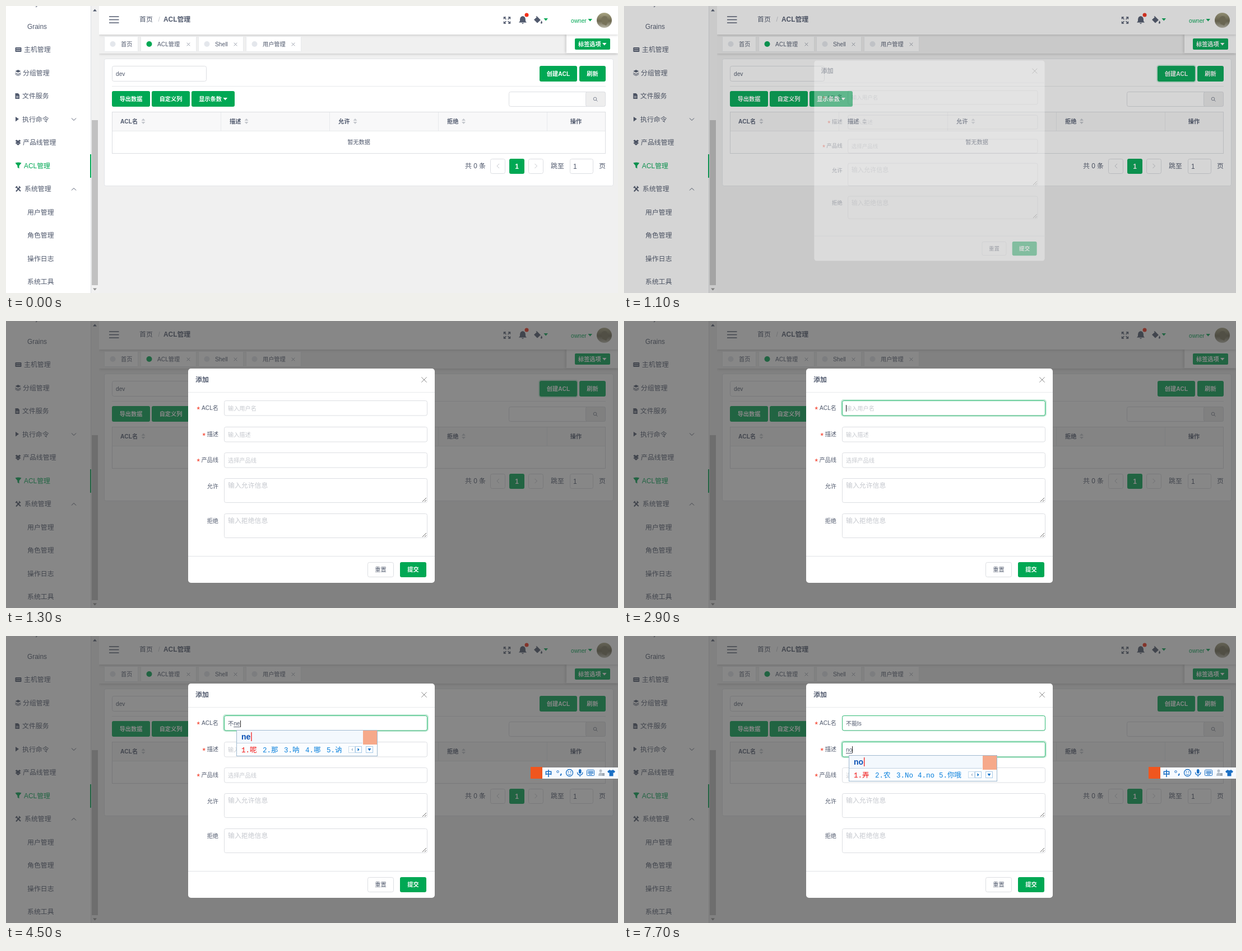
An HTML page for the animation above (8000 ms loop, 1092 by 513 pixels).

```html
<!DOCTYPE html>
<html lang="zh-CN">
<head>
<meta charset="utf-8">
<style>
html, body { margin: 0; width: 100%; height: 100%; overflow: hidden; background: #f0f0f0; }
svg { display: block; font-family: "Liberation Sans", "Noto Sans CJK SC", sans-serif; }
.soft { filter: drop-shadow(0 1px 2px rgba(0, 0, 0, .18)); }
.mono { font-family: "Liberation Mono", "Noto Sans CJK SC", monospace; }
</style>
</head>
<body>
<svg id="stage" width="1092" height="513" viewBox="0 0 1092 513"></svg>
<script>
const LOOP = 8000, STEP = 100;
const INK = '#515a6e', GREEN = '#00a854', LINE = '#dcdee2', PALE = '#c5c8ce', BLUE = '#1a6fc4';
const SMALL = 10.2, LARGE = 11.9;
const stage = document.getElementById('stage');
const pen = document.createElement('canvas').getContext('2d');

// y is the middle of the line of text
const text = (x, y, s, fill = INK, size = SMALL, more = '') =>
  `<text x="${x}" y="${y + size * .37}" fill="${fill}" font-size="${size}" ${more}>${s}</text>`;
const rect = (x, y, w, h, fill, more = '') =>
  `<rect x="${x}" y="${y}" width="${w}" height="${h}" fill="${fill}" ${more}/>`;
const box = (x, y, w, h, fill = '#fff', stroke = LINE, r = 3) =>
  rect(x + .5, y + .5, w - 1, h - 1, fill, `stroke="${stroke}" rx="${r}"`);
const line = (d, stroke = INK, width = 1) =>
  `<path d="${d}" fill="none" stroke="${stroke}" stroke-width="${width}"/>`;
const fill = (d, color = INK) => `<path d="${d}" fill="${color}"/>`;
const dot = (x, y, r, color, more = '') => `<circle cx="${x}" cy="${y}" r="${r}" fill="${color}" ${more}/>`;
const cross = (x, y, r, color) => line(`M${x - r} ${y - r}l${2 * r} ${2 * r}m0 ${-2 * r}l${-2 * r} ${2 * r}`, color);
const drop = (x, y, color, w = 7.5) => fill(`M${x} ${y - 2}h${w}l${-w / 2} 4.4z`, color);
const chevron = (x, y, dx, dy, color) =>
  line(dy ? `M${x - 4} ${y - dy}l4 ${2 * dy}l4 ${-2 * dy}` : `M${x - dx} ${y - 4}l${2 * dx} 4l${-2 * dx} 4`, color);
const BOLD = 'font-weight="bold"', MID = 'text-anchor="middle"', END = 'text-anchor="end"';

const button = (x, y, w, h, label, menu) =>
  rect(x, y, w, h, GREEN, 'rx="3"') +
  text(x + w / 2 - (menu ? 5 : 0), y + h / 2, label, '#fff', SMALL, `${BOLD} ${MID}`) +
  (menu ? drop(x + w - 21 + menu, y + h / 2, '#fff') : '');

const clamp = v => Math.max(0, Math.min(1, v));
const ramp = (t, from, to) => clamp((t - from) / (to - from));
const easeInOut = p => p < .5 ? 2 * p * p : 1 - 2 * (1 - p) ** 2;
const width = (s, font = SMALL + 'px') => {
  pen.font = `${font} "Liberation Sans", "Noto Sans CJK SC", sans-serif`;
  return pen.measureText(s).width;
};

function sidebar() {
  const rows = [['Key', 38], ['Grains', 38], ['主机管理', 32], ['分组管理', 30], ['文件服务', 29], ['执行命令', 29],
    ['产品线管理', 30], ['ACL管理', 32], ['系统管理', 33], ['用户管理', 38], ['角色管理', 38], ['操作日志', 38], ['系统工具', 38]];
  return rect(0, 0, 151, 513, '#fff') + rect(151, 0, 1, 513, LINE) +
    rect(152, 0, 14, 513, '#f1f1f1') + rect(153, 204, 11, 295, '#c1c1c1') +
    fill('M155 9.5h7l-3.5-4z') + fill('M155 504.500h7l-3.5 4z', '#909090') +
    rows.map(([s, x], i) => text(x, -5 + 41.5 * i, s, i == 7 ? GREEN : INK, LARGE)).join('') +
    rect(150, 265, 2, 42, GREEN) +
    rect(16.5, 74, 11, 8, INK, 'rx="1"') + line('M18 76.500h8M18 79.500h8', '#fff', .8) +
    fill('M21.500 114l5 2.500-5 2.500-5-2.500zM16.500 119l5 2.400 5-2.400v1.300l-5 2.400-5-2.400zM16.500 121.500l5 2.400 5-2.400v1l-5 2.400-5-2.400z') +
    fill('M16.500 156h5l2.500 2.500v7.500h-7.500z') + line('M18 161.500h4.500M18 163.500h4.500', '#fff', .8) +
    fill('M17 198l6 4-6 4.500z') +
    fill('M16.500 241l2.500-2 2.500 2 2.500-2 2.500 2-2.500 2 2.500 2-2.500 1.500-2.500-1.500-2.500 1.500-2.500-1.500 2.500-2zM18.500 247l3-1.500 3 1.500-3 2z') +
    fill('M16.500 280.500q5.500-2 11 0l-4 5v5l-3-2v-3z', GREEN) +
    line('M18 331.500l7-8M18 323l8 8', INK, 2) + line('M17 325l3-3M23 322l3 3', INK, 1.5) +
    chevron(121, 202.500, 0, 2, INK) + chevron(121, 327.500, 0, -2, INK);
}

function header() {
  const tabs = [[175, 61, '首页', 205], [240, 100, 'ACL管理', 270], [343, 81, 'Shell', 373], [428, 99, '用户管理', 458]];
  return rect(166, 51, 926, 34, '#f0f0f0', 'class="soft"') +
    rect(1000, 51, 92, 33, '#fff', 'style="filter:drop-shadow(-2px 0 2px rgba(0,0,0,.14))"') +
    rect(166, 0, 926, 51, '#fff', 'class="soft"') +
    line('M184 19h17.500M184 24.500h17.500M184 30h17.500', INK, 1.6) +
    text(238, 24, '首页', INK, LARGE) + text(271.5, 24, '/', PALE, LARGE) + text(281, 24, 'ACL管理', INK, LARGE, BOLD) +
    line('M888.500 23.500v-3.500h3.500M896 20h3.500v3.500M899.500 27.500v3.500h-3.500M892 31h-3.500v-3.500M889 20.500l3.500 3.500M899 20.500l-3.500 3.500M889 30.500l3.500-3.500M899 30.500l-3.500-3.500', INK, 1.5) +
    fill('M922 18q5 .5 5 7v2l2 2.500h-14l2-2.500v-2q0-6.500 5-7zM920 30.500h4q-2 3-4 0z') + dot(929, 16, 3.5, '#f5301a') +
    fill('M947 18l7 7-6 5.500-6-6 5-4.500-1.500-1.500zM955.500 26q3 5 0 5.500t0-5.500z') +
    drop(959.5, 24, GREEN) + text(1008, 26, 'owner', GREEN) + drop(1038.5, 25, GREEN) +
    dot(1067.5, 25.5, 13.5, 'url(#photo)') + fill('M1062 23q3-7 10-4l3 8-4 8-7-3z', '#78735a') +
    tabs.map(([x, w, s, tx], i) => box(x, 54, w, 28, '#fff', '#e8eaec', 1) +
      dot(tx - 14.5, 68, 5, i == 1 ? GREEN : '#e4e7ec') + text(tx, 68, s) +
      (i ? cross(x + w - 14.500, 68.5, 2.8, '#9aa0ac') : '')).join('') +
    rect(1015, 58, 63, 20, GREEN, 'rx="2"') + text(1021, 68, '标签选项', '#fff', SMALL, BOLD) + drop(1064, 68, '#fff');
}

function card() {
  const cols = [['ACL名', 204, 245], ['描述', 399, 429], ['允许', 593, 623], ['拒绝', 787, 816.5]];
  const pageBox = x => box(x, 273, 27, 27);
  return box(175, 94, 909, 228, '#fff', '#e3e5e8') +
    box(189, 107, 169, 28) + text(196, 121, 'dev') +
    button(952, 107, 67, 28, '创建ACL') + button(1023, 107, 47, 28, '刷新') +
    rect(189, 143, 881, 1, '#e8eaec') +
    button(189, 152, 68, 28, '导出数据') + button(260, 152, 68, 28, '自定义列') + button(331, 152, 77, 28, '显示条数', .5) +
    box(897, 153, 173, 27) + box(1034, 153, 36, 27, '#eee') +
    dot(1051, 166, 2.8, 'none', 'stroke="#808695"') + line('M1053 168l2.500 2.500', '#808695') +
    box(189, 189, 881, 75, '#fff', LINE, 0) + rect(190, 190, 879, 33, '#f8f8f9') + rect(190, 223, 879, 1, '#e8eaec') +
    [383, 577, 771, 965].map(x => rect(x, 190, 1, 33, '#e8eaec')).join('') +
    cols.map(([s, x, sort]) => text(x, 206, s, INK, SMALL, BOLD) +
      fill(`M${sort - 3.5} 205l3.500-4 3.500 4zm0 2h7l-3.500 4z`, PALE)).join('') +
    text(1017, 206, '操作', INK, SMALL, BOLD + MID.padStart(21)) +
    text(629.5, 243, '暂无数据', INK, SMALL, MID) +
    text(819, 286, '共 0 条', INK, LARGE) + pageBox(864) + chevron(878, 286, -2, 0, PALE) +
    rect(898, 273, 27, 27, GREEN, 'rx="3"') + text(911.5, 286.5, '1', '#fff', LARGE, `${BOLD} ${MID}`) +
    pageBox(932) + chevron(945.5, 286, 2, 0, PALE) +
    text(972, 286, '跳至', INK, LARGE) + box(1006, 273, 42, 27) + text(1012, 286.5, '1', INK, LARGE) + text(1058, 286, '页', INK, LARGE);
}

const page = `<defs><linearGradient id="photo" x2="0" y2="1"><stop stop-color="#a9a583"/><stop offset=".55" stop-color="#6f6a52"/>
  <stop offset="1" stop-color="#b9b7a8"/></linearGradient></defs>` +
  rect(0, 0, 1092, 513, '#f0f0f0') + card() + header() + sidebar();

// start time, field, committed text, text being composed, candidates
const typing = [
  [1900, 0, '', ''],
  [4000, 0, '', 'b', '不 吧 被 把 b'],
  [4100, 0, '', 'bu', '不 部 步 布 b'],
  [4300, 0, '不', ''],
  [4400, 0, '不', 'n', '你 那 能 年 呢'],
  [4500, 0, '不', 'ne', '呢 那 呐 哪 讷'],
  [4600, 0, '不', 'neng', '能 嫩 弄 农 浓'],
  [4700, 0, '不能', ''],
  [5700, 0, '不能', 'l', '了 来 里 老 啦'],
  [5800, 0, '不能', 'ls', '老师 历史 ls 临时 零食'],
  [6100, 0, '不能ls', ''],
  [6400, 1, '', ''],
  [7700, 1, '', 'no', '弄 农 No no 你哦']
];
const fieldY = [142, 189, 235];

function popup(x, y, typed, list) {
  let cx = x + 9;
  const row = list.split(' ').map((s, i) => {
    const item = text(cx, y + 35, `${i + 1}.${s}`, i ? '#0a80dc' : '#f01010', 12.5, 'class="mono"');
    cx += 25 + [...s].reduce((sum, c) => sum + (c > 'z' ? 13 : 6.5), 0);
    return item;
  }).join('');
  const w = cx - x + 53;
  return box(x, y, w, 47, '#fbfdff', '#9fb9cf', 0) + rect(x + 1, y + 1, w - 2, 22, '#f3f8fd') +
    rect(x + 1, y + 23, w - 28, 1, '#c3d2e0') +
    text(x + 9, y + 12, typed, '#0a50b4', 14, BOLD) +
    rect(x + 10 + width(typed, 'bold 14px'), y + 4, 1.2, 16, '#f01010') + row +
    box(cx + 1, y + 29, 12, 12, '#fff', '#c8dcec', 0) + box(cx + 13, y + 29, 12, 12, '#fff', '#a8cbe8', 0) +
    box(cx + 32, y + 29, 13, 12, '#fff', '#a8cbe8', 0) +
    fill(`M${cx + 9} ${y + 32}v6l-3-3z`, '#b8c8d8') + fill(`M${cx + 17.500} ${y + 32}v6l3-3z`, '#0a70c8') +
    drop(cx + 35.5, y + 35, '#0a70c8', 6) + rect(x + w - 26, y + 1, 25, 25, '#f6a98a');
}

function toolbar() {
  return rect(946, 235, 146, 20, '#f6faff') + rect(936, 234, 21, 21, '#f0561e') +
    text(968, 245, '中', BLUE, 13, BOLD + MID.padStart(21)) +
    dot(984.5, 242.5, 1.8, 'none', `stroke="${BLUE}"`) + line('M990 246q1.500 1 -1 3.500', BLUE, 2) +
    dot(1005.5, 244.5, 6, 'none', `stroke="${BLUE}" stroke-width="1.3"`) +
    dot(1003.5, 243, 1, BLUE) + dot(1007.5, 243, 1, BLUE) + line('M1002.500 246q3 3.500 6 0', BLUE) +
    rect(1022, 238, 4.5, 8, BLUE, 'rx="2.2"') + line('M1019.500 243.500q0 5 4.700 5t4.700-5M1024.200 248.500v3', BLUE, 1.3) +
    rect(1036.5, 239.5, 13, 10, 'none', `stroke="${BLUE}" rx="1"`) +
    line('M1038.500 242.500h9.500M1038.500 245h9.500', BLUE, 1.4) + line('M1040 247.500h6', BLUE) +
    dot(1061, 241, 2.5, '#b4bec8') + fill('M1057 250q0-6 4-6t4 6z', '#b4bec8') + rect(1064, 245, 4, 5, '#9aa6b2') +
    fill('M1077 239q3 2.500 6 0l4 3-2 3-1.500-1v6.500h-7v-6.500l-1.500 1-2-3z', BLUE);
}

function field(i, value, hover, focus) {
  const y = fieldY[i], names = ['输入用户名', '输入描述', '选择产品线'];
  return (focus ? rect(388, y - 1, 365, 29, 'none', `rx="4" stroke="${GREEN}" stroke-width="2" opacity="${.25 * focus}"`) : '') +
    box(389, y, 363, 27.500) +
    (hover ? `<g opacity="${hover}">${box(389, y, 363, 27.500, 'none', '#30bb75')}</g>` : '') +
    (value ? text(396, y + 14, value) : text(396, y + 14, names[i], PALE));
}

function dialog(t, state) {
  const [at, active, done, typed] = state || [0, -1, '', ''];
  const values = active == 1 ? ['不能ls', done + typed] : [done + typed, ''];
  const focus = [ramp(t, 1800, 2100) * (1 - ramp(t, 6300, 6600)), ramp(t, 6300, 6600)];
  const hover = [ramp(t, 1600, 1800), focus[1]];
  const label = (s, y, star) => text(379, y, s, INK, SMALL, END) +
    (star ? text(star, y + 2.5, '*', '#f5301a', 14, END) : '');
  const area = (y, s) => box(389, y, 363, 44) + text(396, y + 13, s, PALE, LARGE) +
    line(`M743 ${y + 42}l7-7M747 ${y + 42}l3-3`, '#666');
  let out = rect(325, 85, 440, 383, '#fff', 'rx="5"') + rect(325, 127, 440, 1, '#e8eaec') + rect(325, 420, 440, 1, '#e0e2e6') +
    text(338, 105, '添加', INK, LARGE, BOLD) + cross(746, 105, 4.7, '#8c8c8c') +
    label('ACL名', 155, 346) + label('描述', 202, 356) + label('产品线', 248, 346) + label('允许', 295) + label('拒绝', 357) +
    fieldY.map((_, i) => field(i, values[i], hover[i], focus[i])).join('') +
    area(281, '输入允许信息') + area(344, '输入拒绝信息') +
    box(645, 431, 47, 27) + text(668.5, 444.5, '重置', INK, SMALL, MID) + button(703, 431, 47, 27, '提交');
  if (state) {
    const y = fieldY[active], x = 396 + width(done), end = x + width(typed);
    if (typed) out += rect(x, y + 20, end - x, 1, INK);
    if (typed || Math.floor((t - at) / 500) % 2 == 0) out += rect(Math.round(end), y + (done ? 9 : 8), 1, 12, '#222');
  }
  return out;
}

function scene(t) {
  const state = typing.filter(s => s[0] <= t).pop();
  const open = easeInOut(ramp(t, 975, 1275));
  const ring = ramp(t, 700, 900) * (1 - ramp(t, 1800, 2100));
  const searchHover = clamp(1 - Math.abs(t - 480) / 110);
  let out = page;
  if (searchHover) out += `<g opacity="${searchHover}">${box(897, 153, 138, 27, 'none', GREEN)}</g>`;
  if (ring) out += rect(951, 106, 69, 30, 'none', `rx="4" stroke="${GREEN}" stroke-width="2" opacity="${.2 * ring}"`);
  if (open) out += rect(0, 0, 1092, 513, '#373737', `opacity="${.6 * open}"`) +
    `<g opacity="${open}" transform="translate(545 276.5) scale(${.9 + .1 * open}) translate(-545 -276.5)">${dialog(t, state)}</g>`;
  if (t >= 3000) out += toolbar();
  if (state && state[3]) {
    const [, active, done, typed, list] = state;
    out += popup(Math.round(401 + width(done)), active ? 213 : done ? 168 : 167, typed, list);
  }
  return out;
}

let shown = -1;
function tick(now) {
  const t = Math.floor(now % LOOP / STEP) * STEP;
  if (t != shown) stage.innerHTML = scene(shown = t);
  requestAnimationFrame(tick);
}
tick(performance.now());
</script>
</body>
</html>
```
